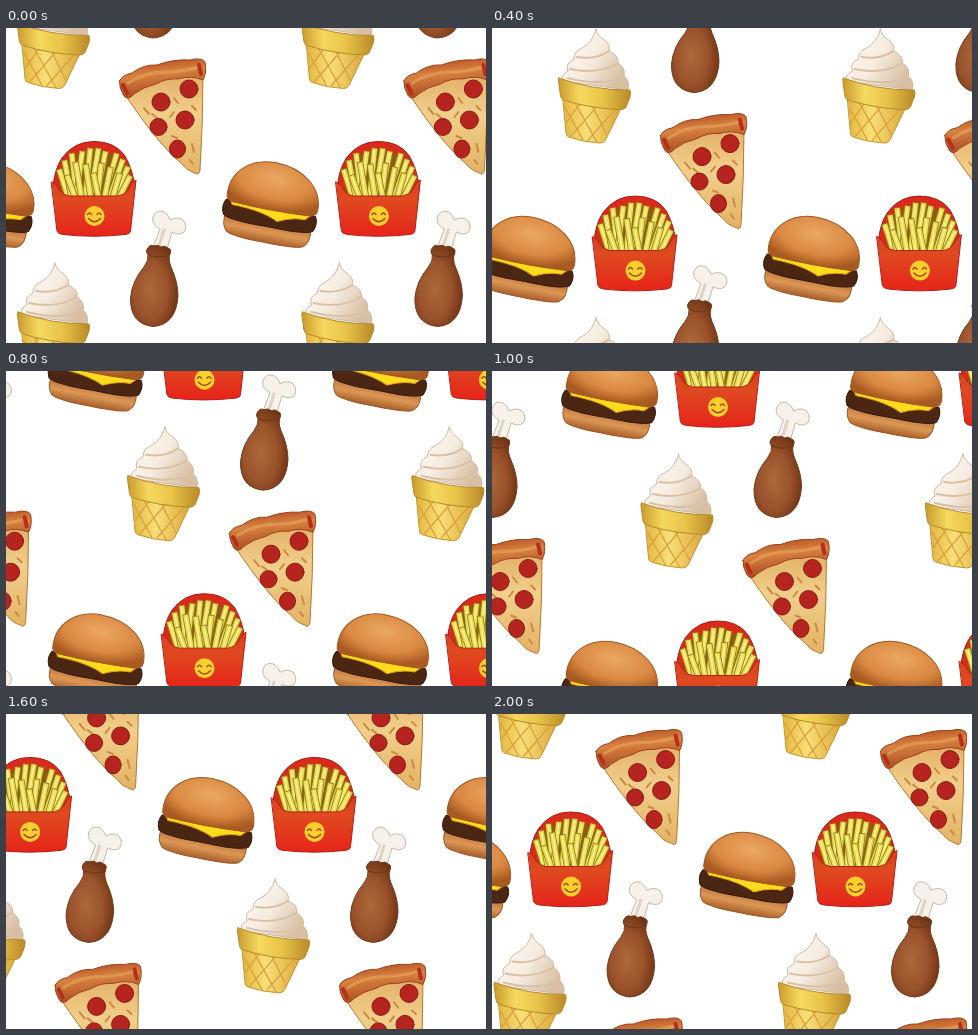
Animation, 480 px wide and 315 px high, one loop 2.1 s. Source, as an HTML page:

```html
<!DOCTYPE html>
<html lang="en">
<head>
<meta charset="utf-8">
<title>Drifting food pattern</title>
<style>
  html, body { margin: 0; width: 100%; height: 100%; overflow: hidden; background: #fff; }
  svg { display: block; width: 480px; height: 315px; }
</style>
</head>
<body>
<svg viewBox="0 0 480 315">
  <defs>
    <radialGradient id="bun" cx=".48" cy=".35" r=".65">
      <stop offset="0" stop-color="#eba861"/><stop offset=".65" stop-color="#d98842"/><stop offset="1" stop-color="#a95a20"/>
    </radialGradient>
    <linearGradient id="base" x2="0" y2="1">
      <stop offset="0" stop-color="#b87236"/><stop offset=".5" stop-color="#dc9755"/><stop offset="1" stop-color="#a95f2b"/>
    </linearGradient>
    <radialGradient id="meat" cx=".42" cy=".55" r=".6">
      <stop offset="0" stop-color="#ad683c"/><stop offset=".6" stop-color="#99522a"/><stop offset="1" stop-color="#6f3415"/>
    </radialGradient>
    <linearGradient id="rim">
      <stop offset="0" stop-color="#c99a2c"/><stop offset=".3" stop-color="#f5d95f"/><stop offset=".6" stop-color="#e9c549"/><stop offset="1" stop-color="#b98a28"/>
    </linearGradient>
    <linearGradient id="wafer">
      <stop offset="0" stop-color="#e2b53f"/><stop offset=".4" stop-color="#f9df79"/><stop offset="1" stop-color="#d9a63a"/>
    </linearGradient>
    <linearGradient id="cream" x2="1" y2=".6">
      <stop offset="0" stop-color="#fffdf9"/><stop offset=".55" stop-color="#f6ece0"/><stop offset="1" stop-color="#d8bfa3"/>
    </linearGradient>
    <linearGradient id="box" x2="0" y2="1">
      <stop offset="0" stop-color="#d9401f"/><stop offset=".35" stop-color="#df4a20"/><stop offset="1" stop-color="#e6241a"/>
    </linearGradient>
    <linearGradient id="cheese" x2="0" y2="1">
      <stop offset="0" stop-color="#e3b066"/><stop offset=".4" stop-color="#f1cf8b"/><stop offset="1" stop-color="#e3b365"/>
    </linearGradient>
    <linearGradient id="crust" x2=".25" y2="1">
      <stop offset="0" stop-color="#a8401c"/><stop offset=".45" stop-color="#d88240"/><stop offset="1" stop-color="#a94a22"/>
    </linearGradient>

    <g id="tile" stroke-linejoin="round" stroke-linecap="round">
      <!-- fries -->
      <path d="M47 160Q48 142 56 130Q68 113.500 88 113.500Q109 113.500 119 128Q127 142 129 160L122 176H54Z" fill="#d92a1c" stroke="#a81c14"/>
      <path d="M53 150Q60 124 88 122Q116 124 123 150L118 176H58Z" fill="#8f5a14"/>
      <g id="sticks" fill="none"></g>
      <path d="M45.500 154Q50 155 54 163Q57 167 63 168H112Q119 167 122 162Q125 154 130 152L124.500 203Q124 206 119 206.500Q88 210 57 206.500Q52 206 51 203Z" fill="url(#box)" stroke="#b51f15"/>
      <circle cx="88.500" cy="188" r="10" fill="#fbd02c"/>
      <path d="M81.500 186.500q2-3 4 0M91 186.500q2-3 4 0M82.500 190.500q6 6.500 12 0" fill="none" stroke="#a5461c" stroke-width="1.500"/>

      <!-- burger -->
      <g transform="translate(265 177) rotate(11)">
        <path d="M-43 17Q0 22 44 17Q46 30 39 35Q32 38.500 0 38Q-32 38.500-39 34Q-45 28-43 17Z" fill="url(#base)" stroke="#9b5726"/>
        <path d="M-45 3Q0-3 46 3Q50 10 46 18Q38 23 0 22Q-38 23-45 18Q-49 10-45 3Z" fill="#4b2613" stroke="#34180b"/>
        <path d="M-42 1H43L36 8Q22 8 9 15Q-8 7-38 7Z" fill="#ffdb1e" stroke="#dca512"/>
        <path d="M-45-2C-47-26-28-42.500-3-42.500C24-42.500 47-27 47-3Q47 3 38 3.500Q0 6-38 4Q-45 3-45-2Z" fill="url(#bun)" stroke="#a2581f"/>
      </g>

      <!-- drumstick -->
      <path d="M146 222L154 201Q145 196 147 189Q150 181 158 184Q163 187 164 192Q171 188 177 192Q182 198 178 204Q173 208 166 204L160 224Z" fill="#f6f1e9" stroke="#c5b8a7"/>
      <path d="M158 202L153 218" stroke="#ded3c4" stroke-width="3"/>
      <path d="M142 220Q144 216 148 218Q152 216 155 219Q159 217 162 220Q166 221 164 226Q162 231 165 239Q172 254 172 268Q170 297 147 298.500Q124 296 124.500 270Q126 253 138 239Q143 232 142 227Q139 223 142 220Z" fill="url(#meat)" stroke="#733918"/>
      <path d="M143 227Q152 231 163 227" fill="none" stroke="#74391a" stroke-width="1.500"/>

      <!-- pizza -->
      <path d="M120 66L140 54L197 46Q197 95 194 142Q193 148 189 145Q180 142 176 136Q152 116 120 68Z" fill="url(#cheese)" stroke="#b9772f"/>
      <path d="M146 86l5 4M168 70l4 5M166 108l5 2M186 78l4 4M186 116l2 8M138 80l5 6M168 84l-4 5M184 132l3 4" stroke="#cc8a41" stroke-width="2"/>
      <g fill="#b5241f" stroke="#8c1a17">
        <circle cx="155" cy="74" r="9"/><circle cx="183" cy="61" r="9"/><circle cx="179" cy="92" r="9"/>
        <circle cx="152.500" cy="99" r="8.500"/><ellipse cx="171.500" cy="121" rx="8" ry="9"/>
      </g>
      <path d="M113.500 53Q116 47 126 45Q138 36 151 37Q167 31 184 32Q195 29 199 34Q201 45 197 52Q185 47 172 51Q160 50 150 56Q137 59 128 66Q122 73 118 68Q113 60 113.500 53Z" fill="url(#crust)" stroke="#a0401d"/>
      <path d="M122 55Q140 44 158 44T192 39" fill="none" stroke="#e4a058" stroke-width="3" opacity=".7"/>
      <path d="M117 57l4 8M193 37l2 9" stroke="#b5301c" stroke-width="4"/>

      <!-- ice cream -->
      <g transform="translate(-82 207)">
        <path d="M98 95L157 105L140.500 139Q139 142 135 142Q118 141 104 136Q101 135 101 132Z" fill="url(#wafer)" stroke="#c4942f"/>
        <path d="M100 106L118 139M109 100L132 141M126 102L142 134M116 101L101 122M134 103L106 135M152 106L123 139" fill="none" stroke="#d9a23a" stroke-width="1.300"/>
        <path d="M131 28Q132 34 138 38Q146 43 144 50Q154 54 153 62Q161 67 159 75Q165 80 163 89L98 80Q95 74 103 70Q100 62 109 58Q109 50 117 47Q128 41 131 28Z" fill="url(#cream)" stroke="#cdb9a2"/>
        <path d="M112 56Q130 59 144 50M105 68Q132 74 153 62M103 77Q138 86 159 75" fill="none" stroke="#d9c1a6" stroke-width="2"/>
        <path d="M94 77Q126 89 165 89Q166 91 165 96L161 106Q159 109 154 108.500Q124 107 99 99Q96 98 95.500 95L93.500 80Q93 78 94 77Z" fill="url(#rim)" stroke="#b78a2c"/>
      </g>
    </g>
  </defs>
  <g id="field"></g>
</svg>
<script>
  const tileW = 284.4, tileH = 288.5, steps = 21, stepMs = 100;
  const field = document.getElementById('field');

  // top x, top y, bottom x of each stick
  const sticks = [
    [54, 144, 63], [59, 135, 66], [66, 128, 71], [76, 126, 70], [84, 123, 79], [92, 123, 84],
    [99, 126, 90], [110, 128, 97], [116, 134, 103], [121, 141, 108], [123, 150, 112],
    [70, 137, 76], [80, 139, 85], [95, 138, 91], [104, 142, 98], [62, 150, 70], [113, 148, 106], [88, 148, 93]
  ];
  document.getElementById('sticks').innerHTML = sticks.map(([x, y, b]) => {
    const d = `M${x} ${y}L${b} 172`;
    return `<g stroke-linecap="square"><path d="${d}" stroke="#8d7a1c" stroke-width="6.6"/>` +
      `<path d="${d}" stroke="#ecdc55" stroke-width="5"/><path d="${d}" stroke="#f8f08e" stroke-width="1.6"/></g>`;
  }).join('');

  let copies = '';
  for (let i = -2; i < 2; i++)
    for (let j = -2; j < 1; j++)
      copies += `<use href="#tile" x="${i * tileW}" y="${j * tileH}"/>`;
  field.innerHTML = copies;

  function draw() {
    const n = Math.floor(performance.now() / stepMs) % steps;
    field.setAttribute('transform', `translate(${n * 13.75} ${n * 13.65})`);
    requestAnimationFrame(draw);
  }
  draw();
</script>
</body>
</html>
```
